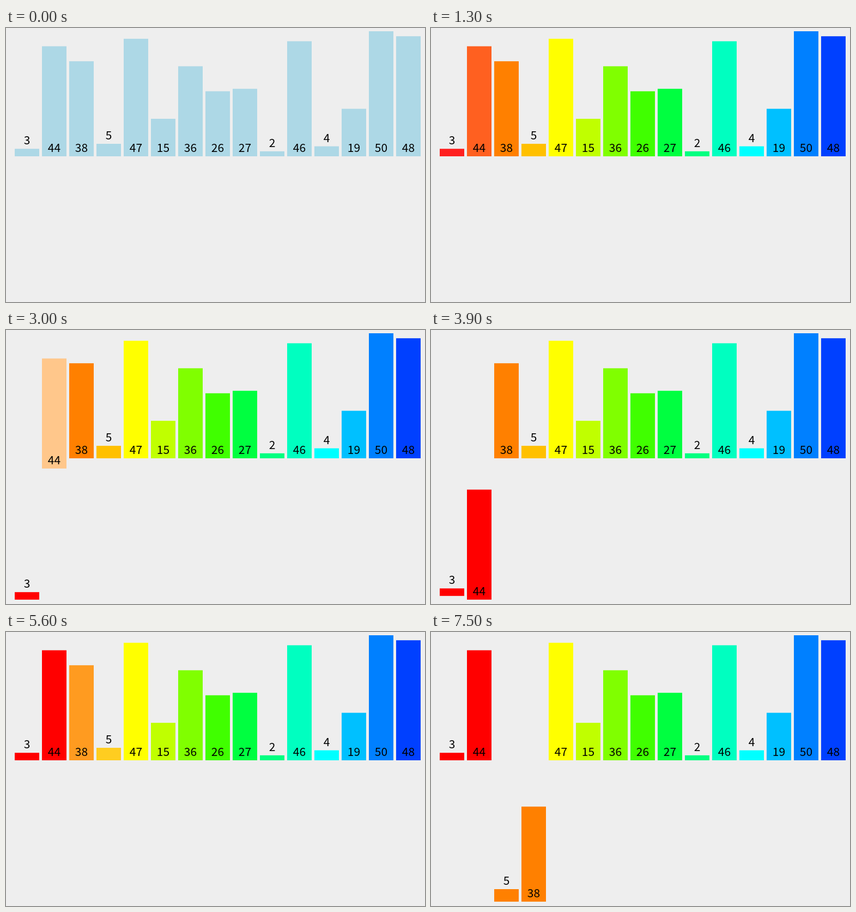
An HTML page for the animation above (8 s loop, 769 by 504 pixels).

```html
<!DOCTYPE html>
<html lang="en">
<head>
<meta charset="utf-8">
<title>Merge sort bars</title>
<style>
  html, body { margin: 0; width: 100%; height: 100%; overflow: hidden; background: #eee; }
  svg { display: block; width: 769px; height: 504px; }
  text { font: 21px "Noto Sans CJK SC", "Noto Sans CJK JP", "Noto Sans", sans-serif; text-anchor: middle; fill: #000; }
</style>
</head>
<body>
<svg id="stage" viewBox="0 0 769 504"></svg>
<script>
const LOOP = 8000, TICK = 100, DURATION = 160;
const LEFT = 16, PITCH = 50, WIDTH = 45, UNIT = 4.6, BASE = 236, DROP = 260;
const values = [3, 44, 38, 5, 47, 15, 36, 26, 27, 2, 46, 4, 19, 50, 48];
const idle = [173, 216, 230];

// Rainbow in sixteen steps, pure green left out.
const rainbow = values.map((_, i) => {
  const hue = i < 8 ? i : i + 1;
  return [4, 0, 8].map((shift, channel) => {
    const peak = [0, 4, 8][channel];
    const gap = Math.min(Math.abs(hue - peak), Math.abs(hue - peak - 12), Math.abs(hue - peak + 12));
    return 0;
  }) && [hueChannel(hue, 0), hueChannel(hue, 8), hueChannel(hue, 16)];
});

// Channel level for a hue on a 24-step wheel: full within 4 steps of its peak, zero beyond 8.
function hueChannel(hue, peak) {
  const d = Math.abs(hue - peak);
  const gap = Math.min(d, 24 - d);
  return Math.min(255, Math.max(0, (8 - gap) * 64));
}

const own = i => rainbow[i];
const light = i => rainbow[i].map(c => Math.min(255, c + 150));
const group = first => () => rainbow[first];

const steps = [
  { at: 411, bars: values.map((_, i) => i), fill: own },
  { at: 1240, bars: [0, 1], fill: light },
  { at: 2085, bars: [0], fill: group(0), y: DROP },
  { at: 2958, bars: [1], fill: group(0), y: DROP },
  { at: 3870, bars: [0], y: 0 },
  { at: 4667, bars: [1], y: 0 },
  { at: 5540, bars: [2, 3], fill: light },
  { at: 6384, bars: [3], fill: group(2), y: DROP, slot: 2 },
  { at: 7280, bars: [2], fill: group(2), y: DROP, slot: 3 }
];

const svg = document.getElementById("stage");

function add(parent, tag, attrs) {
  const el = document.createElementNS("http://www.w3.org/2000/svg", tag);
  for (const key in attrs) el.setAttribute(key, attrs[key]);
  return parent.appendChild(el);
}

const bars = values.map(value => {
  const height = value * UNIT;
  const g = add(svg, "g", {});
  const rect = add(g, "rect", { y: BASE - height, width: WIDTH, height });
  const baseline = value < 10 ? BASE - height - 8 : BASE - 8;
  add(g, "text", { x: WIDTH / 2, y: baseline }).textContent = value;
  return { g, rect };
});

const mix = (a, b, p) => a + (b - a) * p;

function ease(t) {
  t = Math.min(1, Math.max(0, t));
  return t < 0.5 ? 4 * t ** 3 : 1 - 4 * (1 - t) ** 3;
}

function draw(time) {
  const state = values.map((_, i) => ({ slot: i, y: 0, fill: idle }));
  for (const step of steps) {
    const p = ease((time - step.at) / DURATION);
    if (!p) break;
    for (const i of step.bars) {
      const s = state[i];
      if (step.fill) {
        const goal = step.fill(i);
        s.fill = s.fill.map((c, k) => mix(c, goal[k], p));
      }
      if (step.y !== undefined) s.y = mix(s.y, step.y, p);
      if (step.slot !== undefined) s.slot = mix(s.slot, step.slot, p);
    }
  }
  state.forEach((s, i) => {
    bars[i].g.setAttribute("transform", `translate(${LEFT + s.slot * PITCH} ${s.y})`);
    bars[i].rect.setAttribute("fill", `rgb(${s.fill.map(Math.round)})`);
  });
}

const start = performance.now();

// Motion advances in held ticks.
function frame() {
  const time = (performance.now() - start) % LOOP;
  draw(Math.floor(time / TICK) * TICK);
  requestAnimationFrame(frame);
}

draw(0);
requestAnimationFrame(frame);
</script>
</body>
</html>
```
